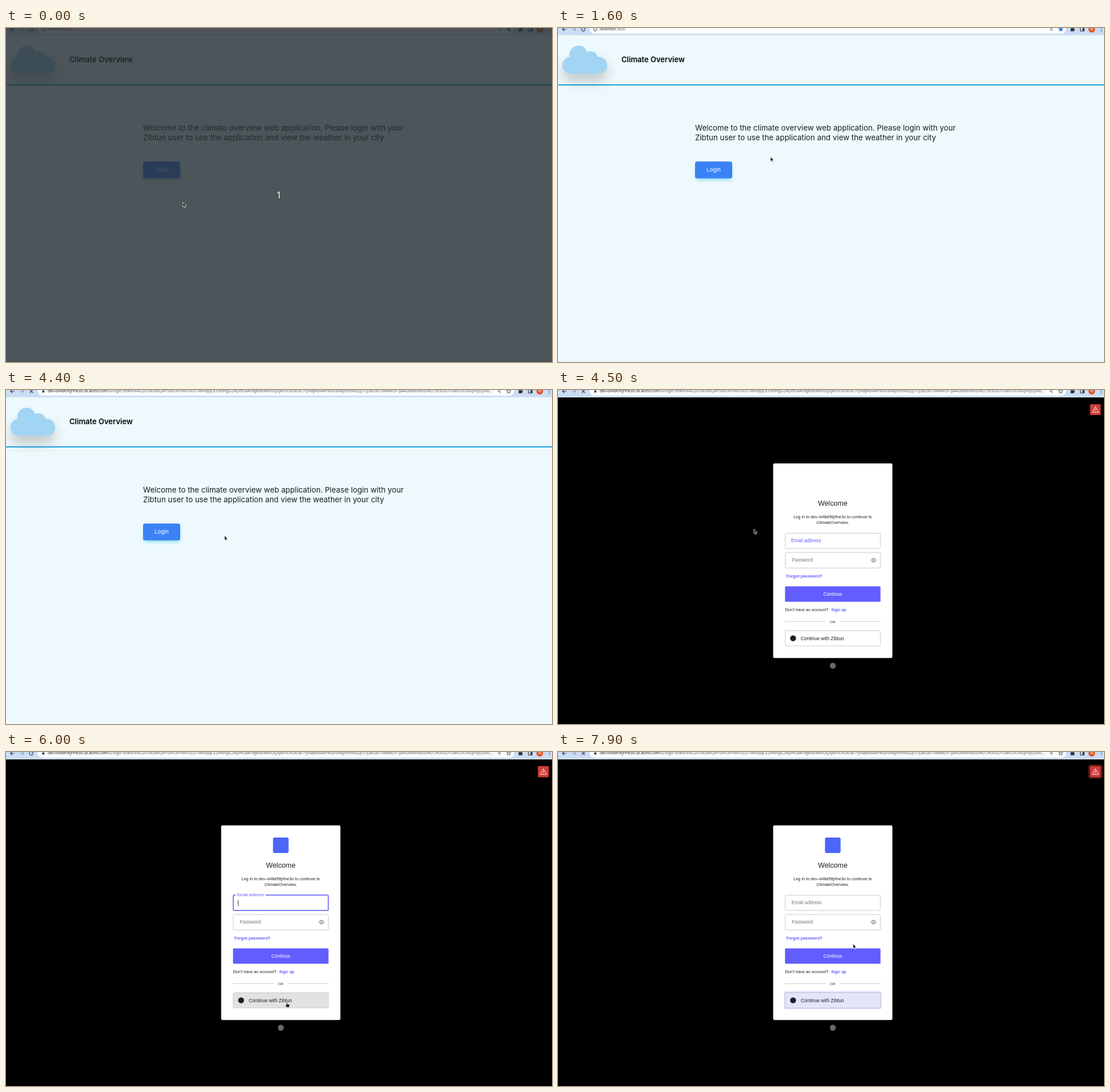
Recreate the animation shown at these times as an HTML page. Size 956 by 586 pixels, loop 8000 ms.

```html
<!DOCTYPE html>
<html lang="en">
<head>
<meta charset="utf-8">
<title>Login walkthrough</title>
<style>
  html, body { margin: 0; width: 100%; height: 100%; overflow: hidden; background: #edf9fc; }
  svg { display: block; width: 956px; height: 586px; }
  .bar { font: 6.6px "Noto Sans", sans-serif; }
  .url { color: #5f6368; line-height: 10px; white-space: nowrap; overflow: hidden; text-overflow: ellipsis; }
  .url b { font-weight: 400; color: #202124; }
  .icon { fill: none; stroke: #30343a; stroke-width: 1.1; }
  .intro { font: 13.32px Inter, sans-serif; fill: #1c1d1e; }
  .form { font: 7.26px "Liberation Sans", Arial, sans-serif; fill: #1e212a; }
  .form .field { font-size: 8.3px; }
  .form .hint { fill: #6f7780; }
  .form .link { font-weight: 700; fill: #635dff; }
  .mid { text-anchor: middle; }
  .box { fill: none; stroke: #c9cace; stroke-width: 1; }
</style>
</head>
<body>
<svg viewBox="0 0 956 586">
  <defs>
    <filter id="blur" x="-50%" y="-150%" width="200%" height="400%"><feGaussianBlur stdDeviation="11"/></filter>
    <filter id="glow" x="-30%" y="-50%" width="160%" height="200%"><feGaussianBlur stdDeviation="3"/></filter>
  </defs>

  <!-- Start page -->
  <g data-at="0 4500">
    <rect width="956" height="586" fill="#edf9fc"/>
    <rect y="98.8" width="956" height="2" fill="#169fe0"/>
    <rect x="8" y="60" width="78" height="34" rx="17" fill="#000" opacity=".19" filter="url(#blur)"/>
    <g fill="#a2d4f4">
      <rect x="7.7" y="50.7" width="78.5" height="29.3" rx="14.6"/>
      <circle cx="35.9" cy="47.2" r="16.2"/>
      <circle cx="57" cy="53" r="12.3"/>
    </g>
    <text x="111" y="60" font-family="Inter, sans-serif" font-size="13" font-weight="600">Climate Overview</text>
    <g class="intro">
      <text x="240" y="180">Welcome to the climate overview web application. Please login with your</text>
      <text x="240" y="196.7">Zibtun user to use the application and view the weather in your city</text>
    </g>
    <rect x="242" y="239" width="61" height="27" rx="4" fill="#06b6d4" opacity=".5" filter="url(#glow)"/>
    <rect x="240" y="234.2" width="65" height="29.6" rx="3.5" fill="#3b82f6"/>
    <text class="mid" x="272.5" y="252.2" font-family="Inter, sans-serif" font-size="9.6" fill="#fff">Login</text>
  </g>

  <!-- Login form -->
  <g class="form" data-at="4500 8000">
    <rect width="956" height="586" fill="#000"/>
    <rect id="pulse" fill="none" stroke="#d03c38"/>
    <rect x="931.5" y="25" width="18.7" height="19" rx="1.5" fill="#d03c38"/>
    <path d="M940.9 29.3L946.4 39.3H935.4ZM940.9 32.7V36M940.9 37V38.1" fill="none" stroke="#fff" stroke-width=".9" stroke-linejoin="round"/>
    <rect x="376.7" y="128.8" width="208.8" height="341.4" rx="2.6" fill="#fff"/>
    <rect data-at="4700 8000" x="467.5" y="150" width="27.3" height="27.3" rx="3" fill="#4c66fb"/>
    <text class="mid" x="481" y="203" font-size="12.45">Welcome</text>
    <text class="mid" x="481" y="224.5">Log in to dev-ot4lbif9tjrfne3o to continue to</text>
    <text class="mid" x="481" y="235.3">ClimateOverview.</text>

    <rect class="box" x="397.9" y="251.3" width="166.4" height="26.7" rx="1.5"/>
    <text class="field" data-at="4500 4700" x="408" y="267.4" fill="#635dff">Email address</text>
    <g data-at="4700 6600">
      <rect x="397.9" y="251.1" width="166.4" height="27" rx="1.5" fill="none" stroke="#635dff" stroke-width="1.5"/>
      <rect x="402.5" y="249" width="52" height="4" fill="#fff"/>
      <text x="405" y="252.6" font-size="7.3" fill="#635dff">Email address</text>
      <rect data-at="4700 5200 5700 6200" x="406.2" y="260.2" width=".9" height="9.4"/>
    </g>
    <text class="field hint" data-at="6600 8000" x="409" y="267.4">Email address</text>

    <rect class="box" x="397.9" y="285" width="166.4" height="27.3" rx="1.5"/>
    <text class="field hint" x="409.5" y="301.2">Password</text>
    <g fill="none" stroke="#5a6068" stroke-width=".9">
      <path d="M547.8 298.6Q552.5 291.8 557.2 298.6Q552.5 305.4 547.8 298.6Z"/>
      <circle cx="552.5" cy="298.6" r="1.6"/>
    </g>
    <text class="link" x="399.8" y="328.8">Forgot password?</text>
    <rect x="397.5" y="344.5" width="167.2" height="27" rx="1.5" fill="#635dff"/>
    <text class="field mid" x="481" y="360.6" fill="#fff">Continue</text>
    <text x="397.6" y="387.7">Don't have an account?</text>
    <text class="link" x="478.2" y="387.7">Sign up</text>
    <path class="box" d="M397.5 406.3H469M493.3 406.3H564.7"/>
    <text class="mid" x="481" y="408.6" font-size="6.2">OR</text>
    <rect data-at="6600 8000" x="396.9" y="421.2" width="168.4" height="28.9" rx="2.5" fill="none" stroke="#dad9fb" stroke-width="2.4"/>
    <rect id="provider" class="box" x="397.9" y="422.3" width="166.4" height="26.7" rx="1.5"/>
    <circle cx="411.6" cy="435.6" r="5.2" fill="#1b1f23"/>
    <text class="field" x="425" y="438.6">Continue with Zibtun</text>
    <circle cx="481.2" cy="483.8" r="5.2" fill="#68696b"/>
  </g>

  <!-- Browser toolbar -->
  <g class="bar">
    <rect width="956" height="12" fill="#cbdcf5"/>
    <rect y="12" width="956" height="1" fill="#dbe4ee"/>
    <rect x="55.5" y="-6" width="834" height="16" rx="8" fill="#fbfdff"/>
    <g class="icon">
      <path d="M14.7 2.2H7.8M11 -1L7.8 2.2L11 5.4"/>
      <path d="M24 2.2H31M27.8 -1L31 2.2L27.8 5.4" stroke="#8d98a8"/>
      <path data-at="0 3100 5200 6300" d="M47.2 .6A3.3 3.3 0 1 0 47.4 3M47.6 -2V1H44.8"/>
      <path data-at="3100 5200 6300 8000" d="M41.6 -.4L47.2 5.2M47.2 -.4L41.6 5.2"/>
      <g data-at="0 4300" stroke-width=".8">
        <circle cx="65.2" cy="2.1" r="3.2"/>
        <path d="M65.2 1.9V4M65.2 .2V1"/>
      </g>
      <g data-at="4300 8000">
        <rect x="63.4" y="1.4" width="3.8" height="3" fill="#30343a" stroke="none"/>
        <path d="M64 1.4V-.4H66.6V1.4" stroke-width=".8"/>
      </g>
      <path d="M866.6 -.2L861.5 2.2L866.6 4.6" stroke-width=".8"/>
      <path id="star" stroke-width=".8"/>
      <path d="M897.6 .2H899.3V-1.5H901.8V.2H903.6V1.7H905V3.8H903.6V5.8H897.6Z" fill="#30343a" stroke="none"/>
      <path d="M914.7 -1.1H921.2V5.2H914.7Z"/>
      <path d="M918.5 -1H921V5H918.5Z" fill="#30343a" stroke="none"/>
    </g>
    <circle cx="934.5" cy="2.2" r="5.7" fill="#e8501c"/>
    <text class="mid" x="934.5" y="4.4" font-size="6" fill="#fff">M</text>
    <path d="M951.4 -1.2v1.3M951.4 1.6v1.3M951.4 4.4v1.3" stroke="#30343a" stroke-width="1.3"/>
    <foreignObject x="73" y="-3" width="781" height="10">
      <div class="url" id="url"></div>
    </foreignObject>
  </g>

  <!-- Countdown -->
  <g data-at="0 100">
    <rect width="956" height="586" fill="rgb(37,44,49)" opacity=".8"/>
    <text class="mid" x="477.9" y="298.6" font-family="'Noto Sans', sans-serif" font-size="15.5" font-weight="500" fill="#fffdf0">1</text>
  </g>

  <g id="cursor" fill="#1c1c1e" stroke="#fff" stroke-width=".7" stroke-linejoin="round">
    <path id="arrow" d="M0 0V8.4L1.9 6.7L3.3 9.6L4.6 9L3.3 6.2H5.8Z"/>
    <path id="hand" d="M-.8 .8Q0 -.5 .8 .8V4L4.6 4.7Q5.4 5 5.2 6L4.4 10H-.4L-2.8 6.6Q-2.6 5.2 -.8 6.4Z"/>
  </g>
</svg>
<script>
  const LOOP = 8000, STEP = 100;
  const byId = id => document.getElementById(id);
  const setAttrs = (el, attrs) => Object.entries(attrs).forEach(([k, v]) => el.setAttribute(k, v));

  // [time, x, y] of the pointer tip
  const route = [
    [0, 309.7, 305.8], [99, 309.7, 305.8], [100, 306.7, 312.5], [300, 306.7, 312.5],
    [400, 309, 314.5], [600, 337, 304], [900, 374, 280], [1000, 374, 280],
    [1200, 425, 266], [1400, 462, 238], [1600, 372, 225.8], [1800, 322, 198],
    [1900, 309, 193], [2200, 288, 228], [2500, 266, 255], [2600, 266, 255],
    [2800, 274, 251.5], [3400, 274, 251.5], [3600, 310, 246], [4000, 420, 259],
    [4200, 420, 259], [4400, 382.6, 255.2], [4500, 343, 243.8], [4600, 343, 243.8],
    [5000, 400, 300], [5500, 482, 392], [5800, 491, 434], [6000, 491.5, 438],
    [6500, 491.5, 438], [6700, 492, 415], [7000, 492, 391], [7100, 492, 391],
    [7900, 516.6, 336.3], [8000, 516.6, 336.3]
  ];

  function pointerAt(t) {
    const i = route.findIndex(p => p[0] > t);
    const [t0, x0, y0] = route[i - 1], [t1, x1, y1] = route[i];
    const k = (t - t0) / (t1 - t0);
    return [x0 + (x1 - x0) * k, y0 + (y1 - y0) * k];
  }

  const inside = (x, y, [l, t, r, b]) => x >= l && x <= r && y >= t && y <= b;
  const LOGIN = [240, 234, 305, 264], SUBMIT = [397, 344, 565, 372], PROVIDER = [397, 422, 565, 449];

  const starPoints = Array.from({ length: 10 }, (_, i) => {
    const r = i % 2 ? 1.7 : 3.9, a = i * Math.PI / 5;
    return `${880.3 + r * Math.sin(a)} ${2.4 - r * Math.cos(a)}`;
  });
  byId('star').setAttribute('d', `M${starPoints.join('L')}Z`);

  function makeToken(length) {
    const chars = 'ABCDEFGHJKLMNPQRSTUVWXYZabcdefghijklmnopqrstuvwxyz0123456789';
    let seed = 41, token = '';
    while (token.length < length) {
      seed = (seed * 16807) % 2147483647;
      token += chars[seed % chars.length];
    }
    return token;
  }

  const localUrl = '<b>localhost</b>:3000';
  const loginUrl = `<b>dev-ot4lbif9tjrfne3o.us.auth0.com</b>/u/login?state=${makeToken(240)}`;

  const timed = [...document.querySelectorAll('[data-at]')].map(el => ({
    el, times: el.dataset.at.split(' ').map(Number)
  }));
  const isOn = (times, t) => times.filter(edge => edge <= t).length % 2 === 1;

  function drawPulse(t) {
    const phase = Math.max(0, t - 4600) % 1300 / 910;
    const k = Math.min(phase, 1), w = 4 * k;
    setAttrs(byId('pulse'), {
      x: 931.5 - w / 2, y: 25 - w / 2, width: 18.7 + w, height: 19 + w,
      rx: 1.5 + w / 2, 'stroke-width': w, opacity: 1 - k * k
    });
  }

  let shownUrl = '';
  function draw(t) {
    timed.forEach(({ el, times }) => { el.style.display = isOn(times, t) ? '' : 'none'; });

    const url = t < 4300 ? localUrl : loginUrl;
    if (url !== shownUrl) byId('url').innerHTML = shownUrl = url;
    setAttrs(byId('star'), t < 4300 ? { fill: '#1a73e8', stroke: '#1a73e8' } : { fill: 'none', stroke: '#30343a' });

    const [x, y] = pointerAt(t);
    const targets = t < 4500 ? [LOGIN] : [SUBMIT, PROVIDER];
    const hand = targets.some(box => inside(x, y, box));
    byId('cursor').setAttribute('transform', `translate(${x} ${y})`);
    byId('hand').style.display = hand ? '' : 'none';
    byId('arrow').style.display = hand ? 'none' : '';

    const hovered = t >= 4500 && inside(x, y, PROVIDER);
    byId('provider').style.fill = t >= 6600 ? '#e5e5fa' : hovered ? '#e2e2e2' : '#fff';
    drawPulse(t);
  }

  function tick() {
    const t = performance.now() % LOOP;
    draw(Math.floor(t / STEP) * STEP);
    requestAnimationFrame(tick);
  }
  tick();
</script>
</body>
</html>
```
